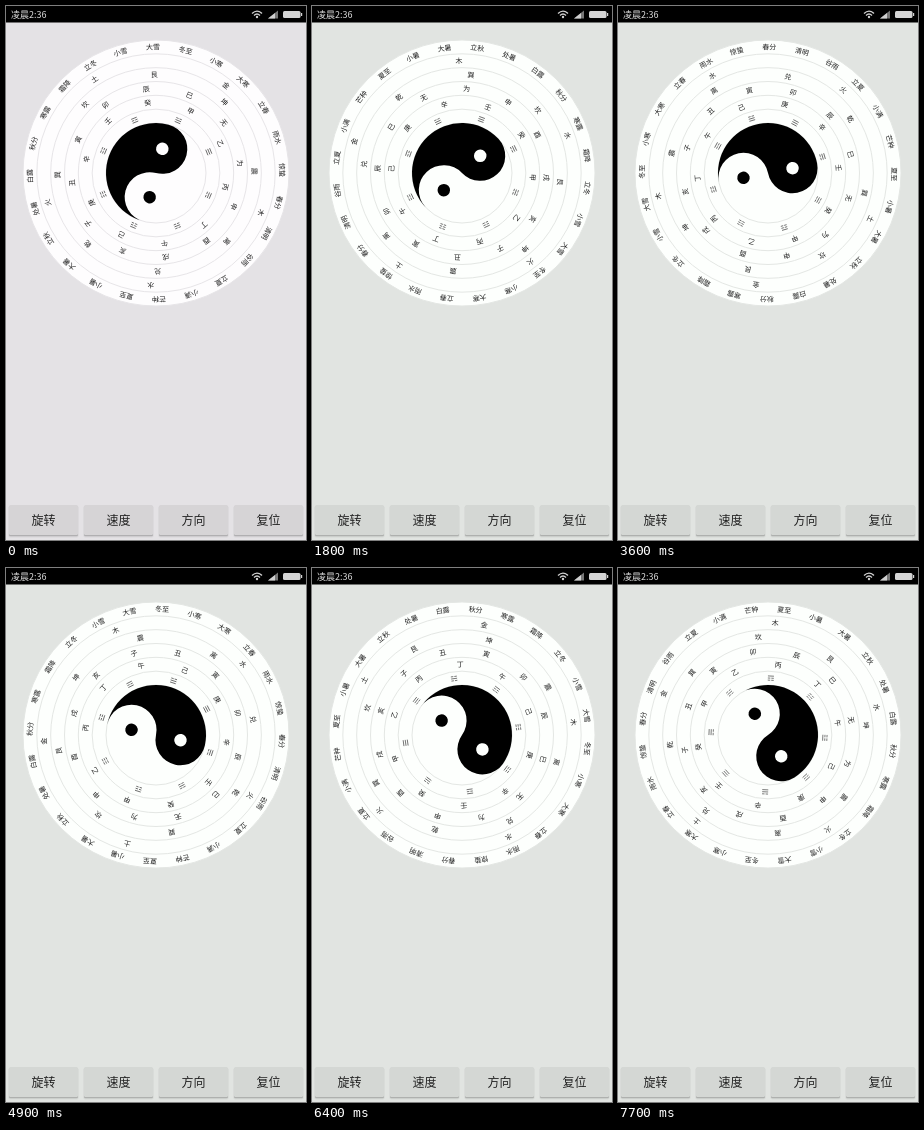
Recreate the animation shown at these times as an HTML page. Size 300 px wide and 534 px high, loop 7800 ms.

```html
<!DOCTYPE html>
<html lang="zh-CN">
<head>
<meta charset="utf-8">
<style>
  html, body { margin: 0; width: 100%; height: 100%; overflow: hidden; background: #e1e4e1; }
  svg { display: block; width: 100%; height: 100%; }
  text { font-family: "Noto Sans CJK SC", "Noto Sans CJK", "Noto Sans", sans-serif; text-anchor: middle; }
</style>
</head>
<body>
<svg id="stage" viewBox="0 0 300 534"></svg>
<script>
const LOOP = 7800, STEP = 100;
const OUTER = 133, INNER = 50, BAND = (OUTER - INNER) / 6;
const COOL = { page: '#e1e4e1', disc: '#fdfffd', line: '#e4e7e4', button: '#d4d7d4', pressed: '#c3c6c3' };
const WARM = { page: '#e4e2e5', disc: '#fefdfe', line: '#e7e5e8', button: '#d6d4d6', pressed: '#c6c4c6' };

// Time in ms and the turn, in degrees, of the innermost symbol
const TURN = [[0, 194.65], [1800, 226.75], [3000, 248.15], [3600, 258.9], [4900, 281.95], [6400, 305.3], [7700, 328.1]];
// Presses of the direction button; the direction flips on release
const PRESSES = [[1900, 2200], [5500, 5800]];

const RINGS = [
  { speed: 4, items: '立春 雨水 惊蛰 春分 清明 谷雨 立夏 小满 芒种 夏至 小暑 大暑 立秋 处暑 白露 秋分 寒露 霜降 立冬 小雪 大雪 冬至 小寒 大寒' },
  { speed: 3.5, flips: true, items: '金 木 水 火 土' },
  { speed: 3, items: '乾 巽 坎 艮 坤 震 离 兑' },
  { speed: 2.5, flips: true, items: '子 丑 寅 卯 辰 巳 无 为 申 酉 戌 亥' },
  { speed: 2, items: '甲 乙 丙 丁 午 己 庚 辛 壬 癸' },
  { speed: 1.5, flips: true, bars: true, items: '111 110 010 100 000 001 101 011' },
];

const stage = document.getElementById('stage');

function add(parent, tag, attrs, content) {
  const node = document.createElementNS('http://www.w3.org/2000/svg', tag);
  for (const key in attrs) node.setAttribute(key, attrs[key]);
  if (content) node.textContent = content;
  parent.appendChild(node);
  return node;
}

// Bars from the rim inwards: 1 is whole, 0 is broken
function trigramPath(bits) {
  return [...bits].map((bit, i) => {
    const y = (i - 1) * 2.1;
    return bit === '1' ? `M-3 ${y}H3` : `M-3 ${y}H-.5M.5 ${y}H3`;
  }).join('');
}

const page = add(stage, 'rect', { width: 300, height: 534 });

function buildStatusBar() {
  add(stage, 'rect', { width: 300, height: 16.5, fill: '#000' });
  add(stage, 'text', { x: 5, y: 12, 'font-size': 9, fill: '#dcdcdc', style: 'text-anchor:start' }, '凌晨2:36');
  const wifi = add(stage, 'g', { fill: 'none', stroke: '#d0d0d0', 'stroke-width': 1.3 });
  add(wifi, 'path', { d: 'M246 7.4Q251 2.8 256 7.4M248 9.5Q251 6.6 254 9.5' });
  add(stage, 'circle', { cx: 251, cy: 11, r: 1.2, fill: '#d0d0d0' });
  add(stage, 'path', { d: 'M262 12.5L272 4.5V12.5Z', fill: '#777' });
  add(stage, 'path', { d: 'M262 12.5L269 6.9V12.5Z', fill: '#d0d0d0' });
  add(stage, 'rect', { x: 277, y: 5, width: 17.5, height: 7, rx: 1.5, fill: '#d4d4d4' });
  add(stage, 'rect', { x: 295, y: 7, width: 1.2, height: 3, fill: '#d4d4d4' });
}

function buildButton(label, i) {
  const x = 3 + 75 * i;
  add(stage, 'rect', { x: x - .6, y: 500, width: 70.2, height: 31.4, rx: 2, fill: '#000', opacity: .06 });
  add(stage, 'rect', { x, y: 500, width: 69, height: 30.2, rx: 1.5, fill: '#000', opacity: .18 });
  const face = add(stage, 'rect', { x, y: 499, width: 69, height: 30, rx: 1.5 });
  add(stage, 'text', { x: x + 34.5, y: 518.6, 'font-size': 12, fill: '#222' }, label);
  return face;
}

function buildRing(ring, i, parent) {
  const group = add(parent, 'g', {});
  const radius = OUTER - BAND * (i + .5);
  const items = ring.items.split(' ');
  items.forEach((item, n) => {
    const transform = `rotate(${360 / items.length * n}) translate(0 ${-radius})`;
    if (ring.bars) {
      add(group, 'path', { d: trigramPath(item), transform, stroke: '#444', 'stroke-width': .7, fill: 'none' });
    } else {
      add(group, 'text', { transform, y: 2.6, 'font-size': 7, fill: '#222' }, item);
    }
  });
  return group;
}

function buildTaiji(parent) {
  const group = add(parent, 'g', {});
  add(group, 'path', { d: 'M0-50A50 50 0 0 0 0 50A25 25 0 0 1 0 0A25 25 0 0 0 0-50Z', fill: '#000' });
  add(group, 'circle', { cy: 25, r: 6.25, fill: '#000' });
  const eye = add(group, 'circle', { cy: -25, r: 6.25 });
  return { group, eye };
}

buildStatusBar();
const buttons = ['旋转', '速度', '方向', '复位'].map(buildButton);
const dial = add(stage, 'g', { transform: 'translate(150 167)' });
const disc = add(dial, 'circle', { r: OUTER });
const lines = add(dial, 'g', { fill: 'none', 'stroke-width': 1 });
for (let i = 0; i <= 6; i++) add(lines, 'circle', { r: OUTER - BAND * i });
const ringGroups = RINGS.map((ring, i) => buildRing(ring, i, dial));
const taiji = buildTaiji(dial);

function turnAt(t) {
  let i = 1;
  while (i < TURN.length - 1 && t > TURN[i][0]) i++;
  const [t0, a0] = TURN[i - 1], [t1, a1] = TURN[i];
  return a0 + (a1 - a0) * (t - t0) / (t1 - t0);
}

function paint(colors, pressed) {
  page.setAttribute('fill', colors.page);
  disc.setAttribute('fill', colors.disc);
  taiji.eye.setAttribute('fill', colors.disc);
  lines.setAttribute('stroke', colors.line);
  buttons.forEach((face, i) => face.setAttribute('fill', pressed && i === 2 ? colors.pressed : colors.button));
}

function render(t) {
  const turn = turnAt(t);
  const flips = PRESSES.filter(([, up]) => t >= up).length;
  const direction = flips % 2 ? 1 : -1;
  const spin = (node, angle) => node.setAttribute('transform', `rotate(${angle})`);
  RINGS.forEach((ring, i) => spin(ringGroups[i], ring.speed * turn * (ring.flips ? direction : 1)));
  spin(taiji.group, turn - 180);
  paint(t < STEP ? WARM : COOL, PRESSES.some(([down, up]) => t >= down && t < up));
}

const start = performance.now();
function tick() {
  const t = (performance.now() - start) % LOOP;
  render(Math.floor(t / STEP) * STEP);
  requestAnimationFrame(tick);
}
tick();
</script>
</body>
</html>
```
